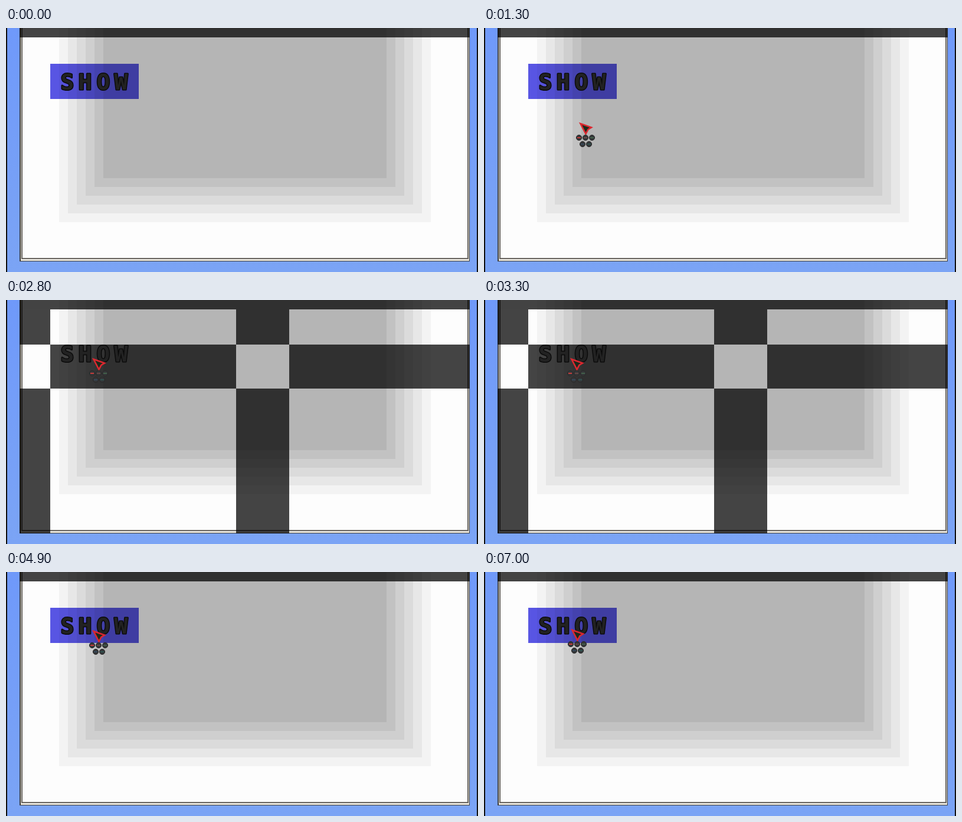
An HTML page that plays this animation: 800 by 416 pixels, repeating every 7100 ms.

```html
<!DOCTYPE html>
<html lang="en">
<head>
<meta charset="utf-8">
<title>Show button</title>
<style>
  html, body { margin: 0; width: 100%; height: 100%; overflow: hidden; background: #78a0f6; }
  svg { display: block; width: 100vw; height: 100vh; }
  rect, .shade { shape-rendering: crispEdges; }
  .button { fill: #5956e5; mix-blend-mode: multiply; }
  .label {
    font: bold 38px "DejaVu Sans Mono", monospace;
    fill: #222; stroke: #0b0b0b; stroke-width: 3;
    stroke-linejoin: round; paint-order: stroke;
  }
</style>
</head>
<body>
<svg viewBox="0 0 800 416" preserveAspectRatio="none">
  <defs>
    <linearGradient id="sky" x2="0" y2="1">
      <stop stop-color="#6f99fa"/>
      <stop offset="1" stop-color="#7ba4f5"/>
    </linearGradient>
  </defs>
  <rect width="800" height="416" fill="#111"/>
  <rect x="2" width="796" height="416" fill="url(#sky)"/>
  <g id="panel"></g>
  <rect class="button" id="button" x="75" y="61" width="150" height="60"/>
  <g class="shade" fill="#000" fill-opacity=".735">
    <path d="M23 0H786V16H23z"/>
    <path id="bars" fill-rule="evenodd" d="M23 16H75V398H23zM390 16H480V398H390zM23 76H786V151H23z"/>
  </g>
  <text class="label" y="105" x="92.5 122.5 153.5 183.5">SHOW</text>
  <g id="cursor">
    <path d="M2.5 -24L21 -17.5L15.5 -14L11.5 -6.5z" fill="#1b2a1b" stroke="#dc2830" stroke-width="2.6"/>
    <g id="dots"></g>
  </g>
</svg>
<script>
const LOOP = 7100;
const $ = id => document.getElementById(id);

function add(parent, tag, attrs) {
  const el = document.createElementNS("http://www.w3.org/2000/svg", tag);
  for (const key in attrs) el.setAttribute(key, attrs[key]);
  $(parent).append(el);
}

// Every layer runs off the top edge: [left, right, bottom, fill]
const layers = [
  [23, 786, 398, "#3b3b3b"],
  [24.5, 785, 396.5, "#ebe8df"],
  [26, 784, 394, "#68645f"],
  [28, 782, 392, "#fdfdfd"]
];
["#f3f3f3", "#e7e7e7", "#dbdbdb", "#cfcfcf", "#c2c2c2", "#b5b5b5"].forEach((fill, i) =>
  layers.push([90 + 15 * i, 720 - 15 * i, 331 - 15 * i, fill]));
for (const [x, right, height, fill] of layers)
  add("panel", "rect", { x, width: right - x, height, fill });

const dots = [
  [0, 0, "#c83c3a"], [11, 0, "#654846"], [22, 0, "#43604a"],
  [6, 11, "#36485a"], [17, 11, "#305450"]
];
for (const [cx, cy, fill] of dots) {
  add("dots", "circle", { cx, cy, r: 4.6, fill: "#343638", stroke: "#2a2a2a" });
  add("dots", "rect", { x: cx - 3, y: cy - 1, width: 6, height: 1.5, fill });
}

function loop(id, frames) {
  const keys = frames.map(([ms, style, easing = "linear"]) =>
    ({ ...style, easing, offset: ms / LOOP }));
  $(id).animate(keys, { duration: LOOP, iterations: Infinity });
}

const at = (x, y) => ({ transform: `translate(${x}px, ${y}px)` });
const hold = "step-end";

// Moves advance once every 100 ms
loop("cursor", [
  [0, at(182, 445), hold],
  [800, at(182, 445), "steps(5)"],
  [1300, at(161, 187), "steps(4)"],
  [1700, at(146, 125), hold],
  [5300, at(146, 124), hold],
  [6500, at(147, 123), hold],
  [LOOP, at(147, 123)]
]);

function toggle(id, open) {
  const show = on => ({ opacity: on ? 1 : 0 });
  loop(id, [
    [0, show(!open), hold],
    [2000, show(open), hold],
    [4500, show(!open), hold],
    [LOOP, show(!open)]
  ]);
}
toggle("bars", true);
toggle("button", false);
</script>
</body>
</html>
```
